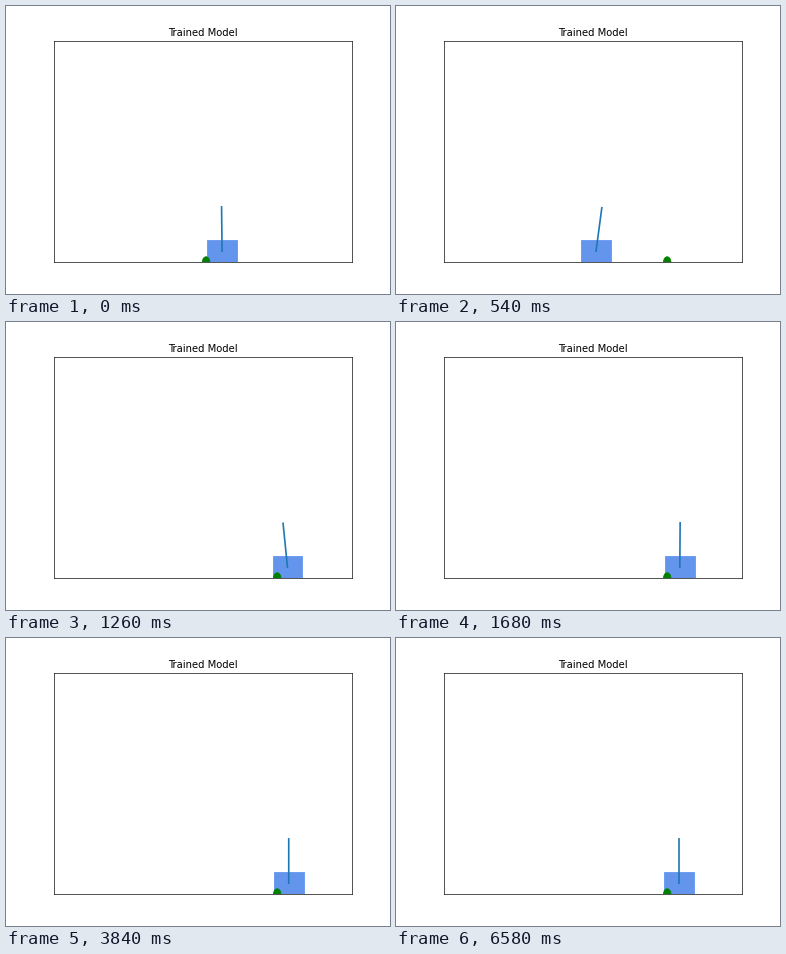
These frames come from a looping animation (384 px wide and 288 px high, 8000 ms). A matplotlib script:

```python
import numpy as np
import matplotlib.pyplot as plt
from matplotlib.animation import FuncAnimation
from matplotlib.patches import Circle, Rectangle

LOOP_MS, INTERVAL, STEP = 8000, 20, 30
CART_W, CART_H, POLE_LEN = 1.0, 0.5, 1.0
GOAL_START, GOAL_END = 0.11, 2.5
REST_X = 2.8965


def cart_position(t):
    """Back away from the goal, swing past the rest point, then creep to it."""
    dt = t - 0.34
    swing = 3.055 * np.cos(1.653 * dt) * np.exp(-1.86 * abs(dt) ** 2.35)
    creep = 0.018 * np.exp(-(t / 4.2) ** 4)
    return REST_X - swing - creep


def pole_angle(t):
    """Lean into the run, lean back to brake, then settle upright."""
    return 0.22 * np.sin(3.88 * (t - 0.02)) * np.exp(-(t / 1.6) ** 4)


fig, ax = plt.subplots(figsize=(6.4, 4.8), dpi=60)
ax.set(xlim=(-5, 5), ylim=(0, 5), xticks=[], yticks=[])
ax.set_title("Trained Model")

cart = ax.add_patch(Rectangle((0, 0), CART_W, CART_H, color="cornflowerblue"))
goal = ax.add_patch(Circle((GOAL_START, 0), 0.125, color="green"))
pole, = ax.plot([], [], color="tab:blue", lw=2, snap=False)


def update(frame):
    t = round(frame * INTERVAL / STEP) * STEP / 1000
    x, angle = cart_position(t), pole_angle(t)
    cart.set_x(x - CART_W / 2)
    goal.center = (GOAL_START if t == 0 else GOAL_END, 0)
    base = CART_H / 2
    pole.set_data([x, x + POLE_LEN * np.sin(angle)],
                  [base, base + POLE_LEN * np.cos(angle)])
    return cart, goal, pole


anim = FuncAnimation(fig, update, frames=LOOP_MS // INTERVAL,
                     interval=INTERVAL, repeat=True, repeat_delay=0)
plt.show()
```
